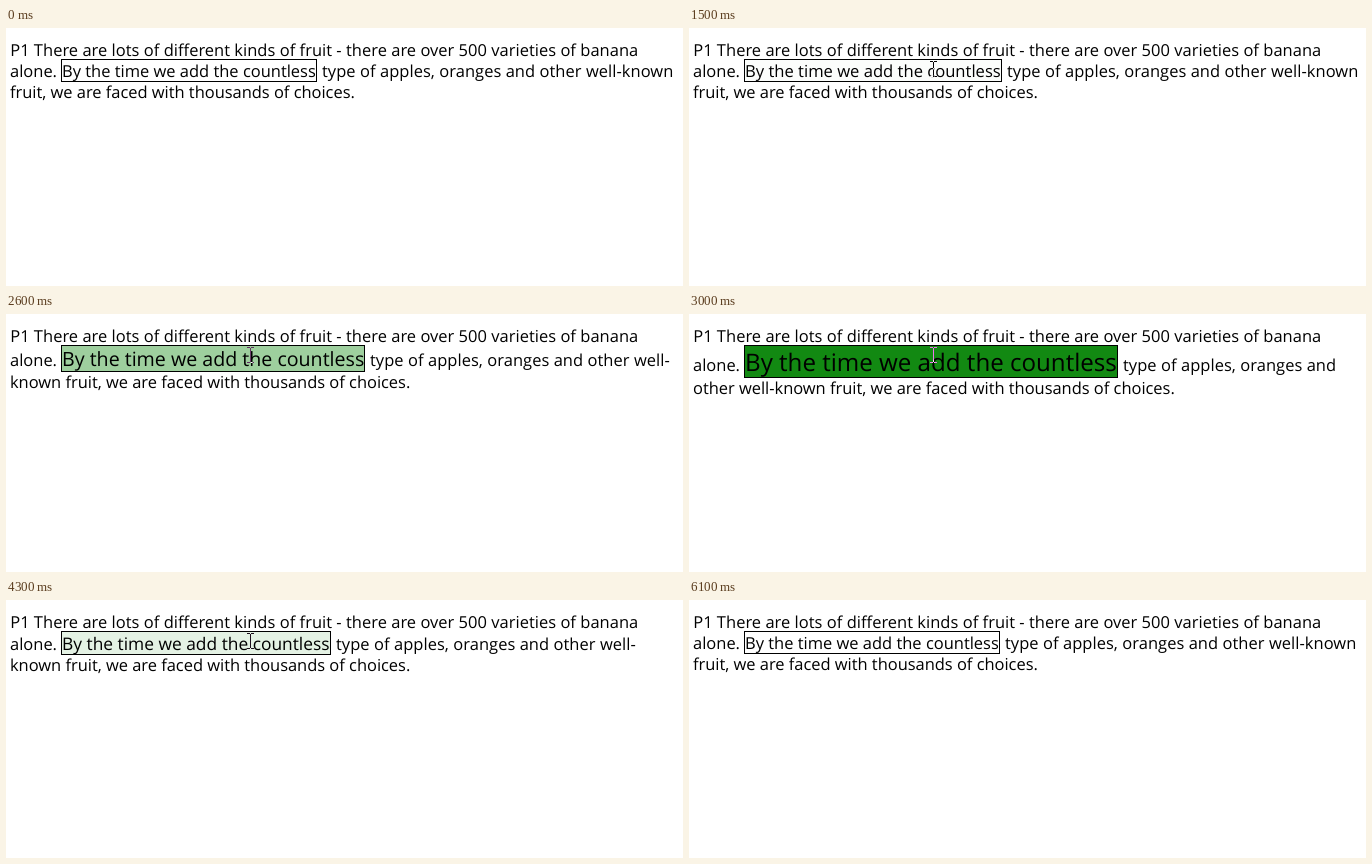
Recreate the animation shown at these times as an HTML page. Size 677 by 258 pixels, loop 6.6 s.

```html
<!DOCTYPE html>
<html lang="en">
<head>
<meta charset="utf-8">
<title>Growing highlight</title>
<style>
  html, body { margin: 0; width: 100%; height: 100%; overflow: hidden; background: #fff; }
  svg { display: block; width: 677px; height: 258px; isolation: isolate; }
  text { font-family: "Open Sans", "Noto Sans", sans-serif; font-size: 16.48px; fill: #000; text-rendering: geometricPrecision; }
  #first { letter-spacing: .025px; }
  #tail { letter-spacing: .05px; }
  #last { letter-spacing: -.025px; }
  #beam { mix-blend-mode: difference; fill: none; stroke: #fff; shape-rendering: crispEdges; }
</style>
</head>
<body>
<svg viewBox="0 0 677 258">
  <rect width="677" height="258" fill="#fff"/>
  <text id="first" x="4.2" y="28">P1 There are lots of different kinds of fruit - there are over 500 varieties of banana</text>
  <text id="lead" x="4">alone.</text>
  <rect id="box" x="55.5" y="31.5" fill="#008000" stroke="#000"/>
  <text id="grow" x="56">By the time we add the countless</text>
  <text id="tail"></text>
  <text id="last" x="4"></text>
  <path id="beam" d="M-3 -7.5H0M1 -7.5H4M.5 -7V7M-3 7.5H0M1 7.5H4"/>
  <path id="arrow" d="M.5 .5V16.5L4.2 13L6.8 18.5L9 17.5L6.5 12H11.5Z" fill="#fff" stroke="#000"/>
</svg>
<script>
const LOOP = 6600, STEP = 100;
const $ = id => document.getElementById(id);
const [lead, box, grow, tail, last, beam, arrow] =
  ["lead", "box", "grow", "tail", "last", "beam", "arrow"].map($);

// Text after the box, split at its possible line breaks
const parts = ["type of apples, oranges and", " other", " well-", "known"];
const rest = " fruit, we are faced with thousands of choices.";
// Widest box that still leaves room for 4, 3 or 2 parts
const limits = [259.6, 310.2, 350.5];

// Pointer: [step, kind, x, y], each held until the next
const pointer = [
  [0, "", 0, 0],
  [1, "arrow", 442, 78], [2, "arrow", 335, 118], [3, "arrow", 277, 123],
  [4, "arrow", 262, 96], [5, "beam", 248, 61], [6, "beam", 244, 41],
  [50, "beam", 257, 71], [51, "arrow", 304, 141], [52, "arrow", 321, 166],
  [57, "arrow", 392, 130], [58, "arrow", 520, 68], [59, "arrow", 643, 10],
  [60, "arrow", 668, 12], [61, "", 0, 0]
];

// CSS "ease": cubic-bezier(.25, .1, .25, 1)
function ease(x) {
  let lo = 0, hi = 1;
  for (let i = 0; i < 30; i++) {
    const s = (lo + hi) / 2;
    if (.75 * s * (1 - s) + s ** 3 < x) lo = s; else hi = s;
  }
  const u = 1 - lo;
  return .3 * lo * u * u + 3 * lo * lo * u + lo ** 3;
}

// The hover animation restarts after every full run
function progress(n) {
  if (n < 6 || n > 50) return 0;
  const x = n * .11 - 1.622;
  return ease(x - Math.floor(x));
}

function layout(p) {
  const size = 16 + 8 * p;
  const w = 2 + 254 * size / 16;
  const width = Math.round(w);
  const asc = Math.round(size * 1.059), desc = Math.round(size * .262);
  const base = 32 + asc;

  box.setAttribute("width", width - 1);
  box.setAttribute("height", asc + desc + 1);
  box.setAttribute("fill-opacity", p);
  grow.style.fontSize = size * 1.03 + "px";
  for (const el of [lead, grow, tail]) el.setAttribute("y", base);
  last.setAttribute("y", base + desc + 17);

  const fit = 4 - limits.filter(m => w > m).length;
  tail.setAttribute("x", 55 + width + 5);
  tail.textContent = parts.slice(0, fit).join("");
  last.textContent = (parts.slice(fit).join("") + rest).trim();
}

function point(n) {
  const [, kind, x, y] = pointer.filter(k => k[0] <= n).pop();
  for (const el of [beam, arrow]) {
    el.setAttribute("visibility", el.id === kind ? "visible" : "hidden");
    el.setAttribute("transform", `translate(${x} ${y})`);
  }
}

function draw() {
  const n = Math.floor(performance.now() % LOOP / STEP);
  layout(progress(n));
  point(n);
  requestAnimationFrame(draw);
}
draw();
</script>
</body>
</html>
```
